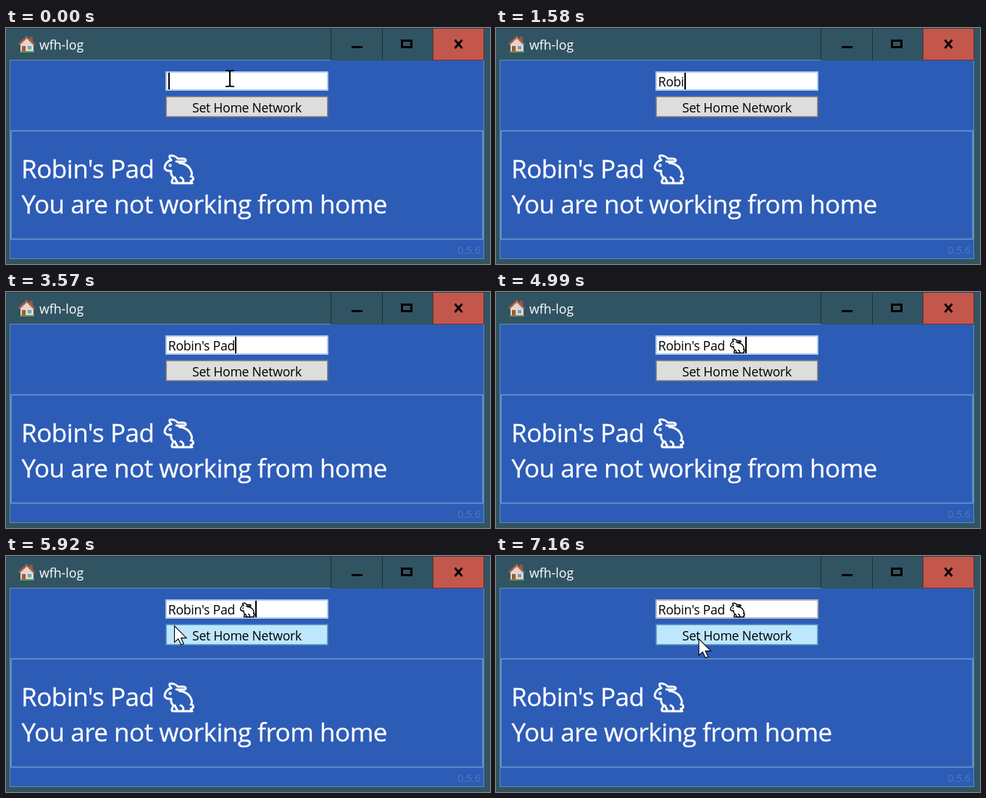
An HTML page for the animation above (8750 ms loop, 668 by 327 pixels).

```html
<!DOCTYPE html>
<html lang="en">
<head>
<meta charset="utf-8">
<title>wfh-log</title>
<style>
  html, body { margin: 0; width: 100%; height: 100%; overflow: hidden; background: #315463; }
  svg { display: block; }
  text { font: 17.6px "Open Sans", "Noto Sans", sans-serif; letter-spacing: -.0135em; white-space: pre; }
  .big { font-size: 35px; fill: #fff; stroke: #fff; stroke-width: .3; }
</style>
</head>
<body>
<svg width="668" height="327" viewBox="0 0 668 327">
  <defs>
    <g id="rabbit" fill="none" stroke-width="2.9" stroke-linejoin="round" stroke-linecap="round">
      <path d="M11 8C9 6 8 3 9 2C13 1 18 3 20 6H27C31 6 32 8 30 10H18"/>
      <path d="M22 12C27 12 34 15 37 20C40 25 40 29 38 31C42 30 43 36 38 37L40 40H27C29 36 27 33 24 32"/>
      <path d="M11 8C6 9 2 14 2 19C3 23 7 23 11 23C10 27 12 30 14 32L12 37C11 40 13 40 16 40H27M16 32L20 40"/>
      <circle cx="9.5" cy="15.5" r=".7"/>
    </g>
  </defs>

  <!-- window -->
  <rect width="668" height="327" fill="#315463"/>
  <path d="M0 .5H668" stroke="#223c48"/>
  <rect x="5.5" y="44.5" width="654" height="275" fill="#2d5cb7" stroke="#648fa8"/>
  <rect x="589" y="1" width="71" height="44" fill="#c4574c"/>
  <path d="M448.5 1V44.5H659.5V1M519.5 1V44M589.5 1V44" fill="none" stroke="#000" stroke-opacity=".45"/>
  <path d="M477 26.5H492M546.5 17.5H559.5V26.5H546.5Z" fill="none" stroke="#000" stroke-width="3"/>
  <path d="M619.5 16.5L629.5 28M629.5 16.5L619.5 28" stroke="#000" stroke-width="2.8"/>
  <text x="46" y="30" fill="#fff" style="font-size:17.7px;letter-spacing:0">wfh-log</text>

  <!-- house icon -->
  <path d="M20 22L29 14L38 22V33H20Z" fill="#e6d6ca"/>
  <path d="M33 12H37V20L33 17Z" fill="#8d5b4c"/>
  <path d="M18 23L28.5 12.5L39 23" fill="none" stroke="#b0604b" stroke-width="2.6"/>
  <path d="M22 25H27V33H22Z" fill="#9a5b3c"/>
  <path d="M30 25H35V29.5H30Z" fill="#63a5cf"/>
  <path d="M19 33H39" stroke="#719052" stroke-width="2"/>

  <!-- status panel -->
  <rect x="7" y="142.5" width="651" height="150" fill="none" stroke="#6595cd" stroke-width="1.7"/>
  <text class="big" x="21" y="208">Robin's Pad</text>
  <use href="#rabbit" x="217" y="175" stroke="#fff"/>
  <text class="big" id="status" x="21.5" y="256.5"></text>
  <text x="655" y="313" text-anchor="end" fill="#4b7cb5" style="font-size:14px;letter-spacing:0">0.5.6</text>

  <!-- form -->
  <rect id="field" x="221" y="61" width="223" height="25" fill="#fff" stroke-width="2"/>
  <text id="typed" x="223.8" y="81"></text>
  <use id="pet" href="#rabbit" stroke="#000" transform="translate(322.5 64.5) scale(.5)"/>
  <rect id="caret" y="62" width="2" height="23"/>
  <rect id="button" x="221" y="95" width="223" height="28" stroke-width="1.6"/>
  <text x="332.5" y="117" text-anchor="middle">Set Home Network</text>

  <path id="beam" d="M-6 -11H-2L0 -10L2 -11H6M0 -10V10M-6 11H-2L0 10L2 11H6" fill="none" stroke="#000" stroke-width="2"/>
  <path id="arrow" d="M.5 .8V23.5L5.7 18.8L9.7 27L13.2 25.5L9.5 17.6H17Z" fill="#fff" stroke="#000" stroke-width="1.1"/>
</svg>
<script>
const LOOP = 8750, NAME = "Robin's Pad ", PET = NAME.length + 1;
const $ = id => document.getElementById(id);
const [status, field, typed, pet, caret, button, beam, arrow] =
  ["status", "field", "typed", "pet", "caret", "button", "beam", "arrow"].map($);

// [time, characters typed, caret visible]
const keys = [
  [0, 0, 1], [580, 0, 0], [1040, 1, 0], [1110, 1, 1], [1250, 2, 1], [1400, 3, 1], [1580, 4, 1],
  [1730, 5, 1], [2130, 6, 1], [2260, 7, 1], [2520, 8, 1], [2980, 9, 0], [3090, 9, 1],
  [3240, 10, 1], [3570, 11, 1], [4040, 12, 1], [4570, 12, 0], [4920, PET, 0], [4990, PET, 1],
  [5520, PET, 0], [5920, PET, 1], [6500, PET, 0]
];

// [time, pointer, x, y]
const moves = [
  [0, beam, 309, 70], [1040, null, 0, 0], [5590, beam, 285, 75], [5650, beam, 260, 78],
  [5710, beam, 231, 81], [5780, arrow, 191, 90], [5850, arrow, 208, 92], [5920, arrow, 232, 96],
  [5990, arrow, 251, 104], [6100, arrow, 270, 111], [6230, arrow, 279.5, 114]
];

const at = (list, t) => list.findLast(step => step[0] <= t);
const show = (el, on) => el.setAttribute("visibility", on ? "visible" : "hidden");
const paint = (el, fill, stroke) => {
  el.setAttribute("fill", fill);
  el.setAttribute("stroke", stroke);
};

function draw(t) {
  const [, count, caretOn] = at(keys, t);
  const [, pointer, x, y] = at(moves, t);
  const hasPet = count === PET;

  typed.textContent = NAME.slice(0, count);
  show(pet, hasPet);
  show(caret, caretOn);
  caret.setAttribute("x", hasPet ? 344 : Math.round(224 + (count && typed.getComputedTextLength())));

  for (const el of [beam, arrow]) {
    show(el, el === pointer);
    el.setAttribute("transform", `translate(${x} ${y})`);
  }

  paint(field, "#fff", t < 7100 ? "#a9c9e9" : "#b2b5ba");
  if (t >= 5920) paint(button, "#bee6fd", "#4d8fbd");
  else paint(button, "#dddddd", "#777");
  status.textContent = `You are ${t < 7160 ? "not " : ""}working from home`;
}

const start = performance.now();
function tick() {
  draw((performance.now() - start) % LOOP);
  requestAnimationFrame(tick);
}
tick();
</script>
</body>
</html>
```
